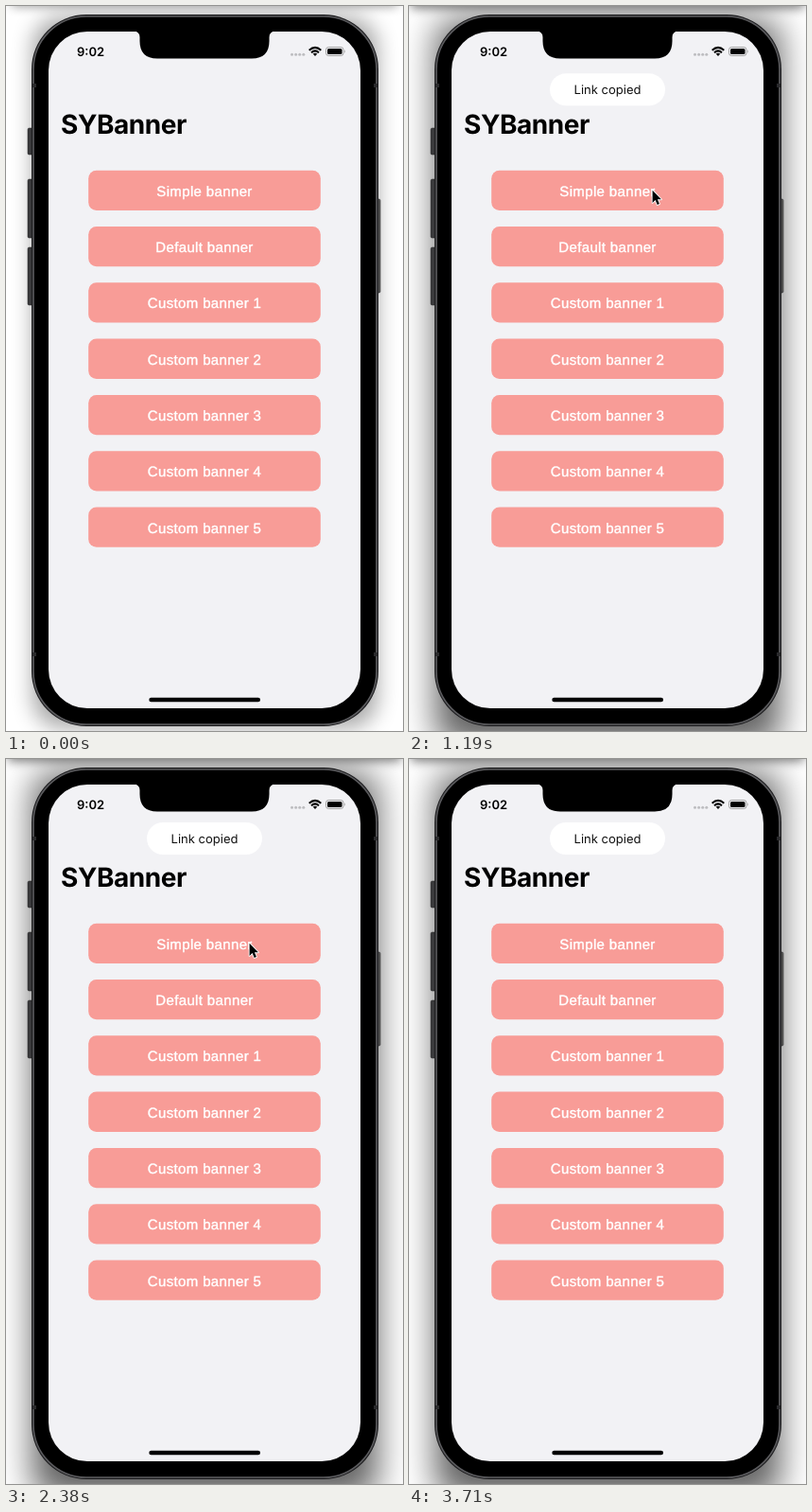
An HTML page for the animation above (3.99 s loop, 420 px wide and 766 px high).

```html
<!DOCTYPE html>
<html lang="en">
<head>
<meta charset="utf-8">
<title>SYBanner</title>
<style>
html, body { margin: 0; width: 100%; height: 100%; overflow: hidden; background: #fff; }
svg { display: block; width: 420px; height: 766px; }
text { font-family: Inter, "Open Sans", sans-serif; text-rendering: geometricPrecision; }
.label { font: 15px "Liberation Sans", Arial, sans-serif; letter-spacing: .36px; fill: #fff; stroke: #fff; stroke-width: .4px; text-anchor: middle; }
</style>
</head>
<body>
<svg viewBox="0 0 420 766">
  <defs>
    <filter id="soft" x="-30%" y="-30%" width="160%" height="160%"><feGaussianBlur stdDeviation="11"/></filter>
    <filter id="wide" x="-30%" y="-30%" width="160%" height="160%"><feGaussianBlur stdDeviation="18"/></filter>
    <filter id="edge" x="-10%" y="-150%" width="120%" height="400%"><feGaussianBlur stdDeviation="6"/></filter>
    <clipPath id="screen"><rect x="45" y="27" width="330" height="715" rx="41"/></clipPath>
  </defs>

  <g id="idleShadow">
    <rect x="28" y="11" width="365" height="752" rx="32" opacity=".34" filter="url(#soft)"/>
    <rect x="6" y="-22" width="408" height="22" opacity=".42" filter="url(#edge)"/>
  </g>
  <g id="activeShadow">
    <rect x="28" y="14" width="365" height="768" rx="24" opacity=".62" filter="url(#wide)"/>
    <rect x="2" y="-22" width="416" height="24" opacity=".55" filter="url(#edge)"/>
  </g>

  <!-- Phone body and side buttons -->
  <g fill="#3a3a3c" stroke="#1c1c1e" stroke-width=".5">
    <rect x="23" y="129" width="6" height="28" rx="1.5"/>
    <rect x="23" y="183" width="6" height="62" rx="1.5"/>
    <rect x="23" y="255" width="6" height="61" rx="1.5"/>
    <rect x="391" y="204" width="5" height="99" rx="1.5" fill="#555"/>
  </g>
  <rect x="27" y="9" width="367" height="752" rx="58" fill="#1c1c1e"/>
  <rect x="29" y="11" width="363" height="748" rx="56" stroke="#5c5c5f" stroke-width="1.6"/>
  <path d="M28 84h4M389 84h4M28 685h4M389 685h4" stroke="#2a2a2c" stroke-width="4"/>

  <g clip-path="url(#screen)">
    <rect x="45" y="27" width="330" height="715" fill="#f2f2f5"/>
    <text x="58" y="134.700" font-size="28" font-weight="700" letter-spacing="-.45">SYBanner</text>
    <g id="buttons"></g>
    <g id="banner">
      <rect x="149" y="67" width="122" height="34" rx="17" fill="#fff"/>
      <text x="210" y="88.600" font-size="13" fill="#111" text-anchor="middle">Link copied</text>
    </g>
    <rect x="151.300" y="730.800" width="117.700" height="4.400" rx="2.200"/>
  </g>

  <path d="M135 26.500Q141.500 27 141.500 33V37Q141.500 55.500 160 55.500H260Q278.500 55.500 278.500 37V33Q278.500 27 285 26.500Z"/>

  <!-- Status bar -->
  <text x="75" y="52.700" font-size="13" font-weight="600">9:02</text>
  <g fill="#bdbdc0">
    <circle cx="302.500" cy="51.300" r="1.500"/><circle cx="306.600" cy="51.300" r="1.500"/>
    <circle cx="310.700" cy="51.300" r="1.500"/><circle cx="314.800" cy="51.300" r="1.500"/>
  </g>
  <path d="M320.700 46.700Q327 41 333.300 46.700M323 49.200Q327 45.600 331 49.200" fill="none" stroke="#000" stroke-width="2"/>
  <path d="M324.700 50.600Q327 48.800 329.300 50.600L327 53Z"/>
  <rect x="338.500" y="43.500" width="18.500" height="9" rx="2.800" fill="none" stroke="#999" stroke-width=".9"/>
  <rect x="340" y="45" width="15.500" height="6" rx="1.500"/>
  <path d="M358.200 46.300q1.500 1.700 0 3.400z" fill="#999"/>

  <path id="cursor" d="M.6 1.200V14.400L3.600 11.600L5.700 16.500L7.900 15.600L5.900 10.800H9.900Z" stroke="#fff" stroke-width="1.800" paint-order="stroke" stroke-linejoin="round"/>
</svg>
<script>
const LOOP = 3990, STEP = 70;
const ACTIVATE = 770, CURSOR_IN = 70, CURSOR_STOP = 560, CURSOR_LEAVE = 3029, CURSOR_LAST = 3220, CURSOR_OUT = 3290;
const taps = [
  { press: 770, release: 850, show: 850 },
  { press: 1610, release: 1812, show: 1836 },
  { press: 2520, release: 2645, show: 2645 }
];
const $ = id => document.getElementById(id);
const clamp = v => Math.min(1, Math.max(0, v));
const smooth = v => v * v * (3 - 2 * v);
const mix = (a, b, u) => a + (b - a) * u;

const names = ["Simple banner", "Default banner", ...[1, 2, 3, 4, 5].map(n => "Custom banner " + n)];
$("buttons").innerHTML = names.map((name, i) => {
  const y = 173.7 + i * 59.3;
  return `<rect x="87.200" y="${y}" width="245.600" height="42.300" rx="8.500" fill="#f89c97"/>
    <text class="label" x="210" y="${y + 27}">${name}</text>`;
}).join("");
const firstLabel = document.querySelector(".label");

// Underdamped spring from -100 px to rest
function bannerOffset(t) {
  const tap = taps.findLast(p => t >= p.show);
  if (!tap) return -100;
  const zeta = 0.7, root = Math.sqrt(1 - zeta * zeta);
  const a = 14 * (t - tap.show) / 1000;
  return -100 * Math.exp(-zeta * a) * (Math.cos(root * a) + zeta / root * Math.sin(root * a));
}

function labelOpacity(t) {
  const tap = taps.findLast(p => t >= p.press);
  return tap ? mix(0.2, 1, smooth(clamp((t - tap.release) / 230))) : 1;
}

function cursorPoint(t) {
  if (t < CURSOR_LEAVE) {
    const u = smooth(clamp((t - CURSOR_IN) / (CURSOR_STOP - CURSOR_IN))), v = 1 - u;
    const curve = (a, b, c) => a * v * v + 2 * b * u * v + c * u * u;
    return [curve(203, 310, 257), curve(713, 400, 193.5)];
  }
  const u = ((t - CURSOR_LEAVE) / (CURSOR_LAST - CURSOR_LEAVE)) ** 2;
  return [mix(257, 185, u), mix(193.5, 724, u)];
}

function show(el, on) { el.style.display = on ? "" : "none"; }

function draw(t) {
  show($("idleShadow"), t < ACTIVATE);
  show($("activeShadow"), t >= ACTIVATE);
  $("banner").setAttribute("transform", `translate(0 ${bannerOffset(t).toFixed(2)})`);
  firstLabel.setAttribute("opacity", labelOpacity(t));
  show($("cursor"), t >= CURSOR_IN && t < CURSOR_OUT);
  $("cursor").setAttribute("transform", `translate(${cursorPoint(t)})`);
}

const start = performance.now();
function tick() {
  const t = (performance.now() - start) % LOOP;
  draw(Math.floor(t / STEP) * STEP);
  requestAnimationFrame(tick);
}
tick();
</script>
</body>
</html>
```
